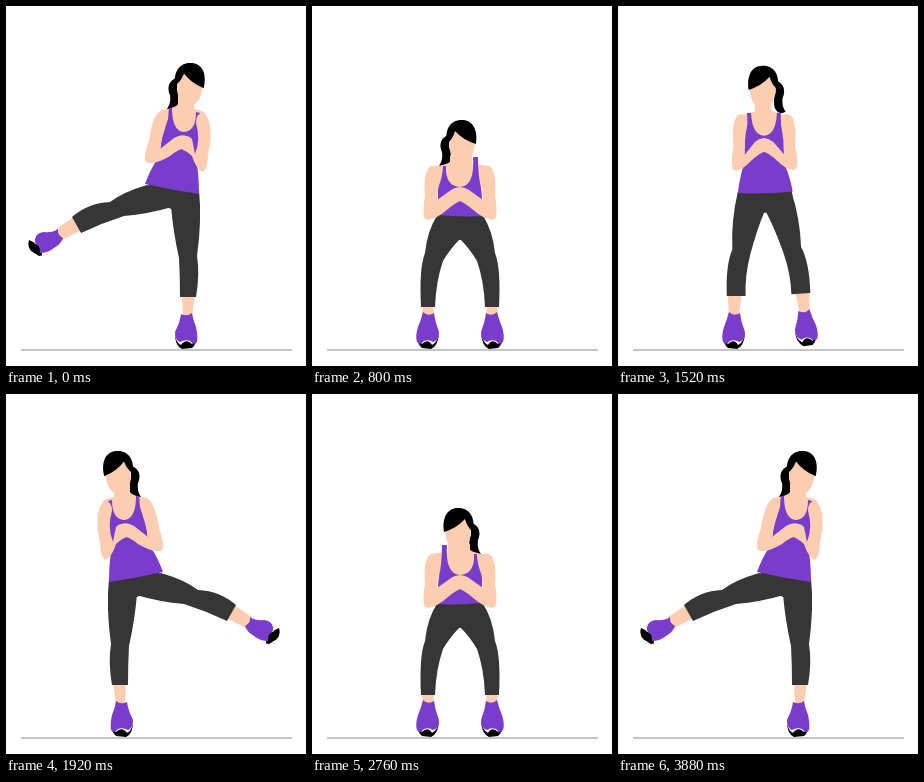
These frames come from a looping animation (300x360 px, 3920 ms). An HTML page:

```html
<!DOCTYPE html>
<html lang="en">
<head>
<meta charset="utf-8">
<title>Squat with side kick</title>
<style>
  html, body { margin: 0; width: 100%; height: 100%; overflow: hidden; background: #fff; }
  svg { display: block; width: 100%; height: 100%; }
</style>
</head>
<body>
<svg id="stage" viewBox="0 0 300 360">
  <path d="M15 344H286" stroke="#8c8c8c" stroke-width="1.2"/>
  <g id="figure"></g>
</svg>
<script>
const LOOP = 3920, HALF = LOOP / 2, STEP = 40, AXIS = 148;
const SKIN = '#fccdb0', PURPLE = '#7a3dcb', DARK = '#363636', BLACK = '#000', WHITE = '#fff';
const KICK_ANGLE = Math.PI / 3, HIP = [135, 195], HIP_KICK = [152, 190];

const figure = document.getElementById('figure');
const numbers = d => d.match(/-?[\d.]+/g).map(Number);
const mirror = d => {
  let i = 0;
  return d.replace(/-?[\d.]+/g, n => i++ % 2 ? n : 2 * AXIS - n);
};
const turn = (x, y, a) => [x * Math.cos(a) - y * Math.sin(a), x * Math.sin(a) + y * Math.cos(a)];

function add(fill, d, parent = figure) {
  const el = document.createElementNS('http://www.w3.org/2000/svg', 'path');
  el.setAttribute('fill', fill);
  if (d) el.setAttribute('d', d);
  parent.appendChild(el);
  return el;
}

function addGroup() {
  return figure.appendChild(document.createElementNS('http://www.w3.org/2000/svg', 'g'));
}

// A part blends three outlines: standing, kicking and squatting.
const parts = [];
function part(fill, stand, kick, squat = stand, swings = false) {
  let kicked = numbers(kick);
  if (swings) {
    for (let i = 0; i < kicked.length; i += 2) {
      const [x, y] = turn(kicked[i] - HIP_KICK[0], kicked[i + 1] - HIP_KICK[1], -KICK_ANGLE);
      kicked[i] = HIP[0] + x;
      kicked[i + 1] = HIP[1] + y;
    }
  }
  parts.push({ el: add(fill), stand, base: numbers(stand), kicked, squat: numbers(squat), swings });
}

// Right-hand outline serves the supporting side; its mirror image is the kicking side.
function legPart(fill, stand, support, kick, squat = stand) {
  part(fill, stand, support, squat);
  part(fill, mirror(stand), kick, mirror(squat), true);
}

function shape({ stand, base, kicked, squat, swings }, k, s) {
  const p = base.map((n, i) => n + k * (kicked[i] - n) + s * (squat[i] - n));
  if (swings) {
    for (let i = 0; i < p.length; i += 2) {
      const [x, y] = turn(p[i] - HIP[0], p[i + 1] - HIP[1], KICK_ANGLE * k);
      p[i] = x + HIP[0] + k * (HIP_KICK[0] - HIP[0]);
      p[i + 1] = y + HIP[1] + k * (HIP_KICK[1] - HIP[1]);
    }
  }
  let i = 0;
  return stand.replace(/-?[\d.]+/g, () => p[i++].toFixed(2));
}

const tail = addGroup();
add(BLACK, 'M136 75C127 77 126 86 129 92C130 99 128 103 126 106Q133 110 137 102Q139 94 136 87Z', tail);

// ankles
legPart(SKIN,
  'M172 287L186 287L185 309L175 309Z',
  'M176 288L189 288L186 310L177 310Z',
  'M76 224L68 211L50 223L56 234Z',
  'M174 298L186 298L185 312L175 312Z');
// shoes: sole, rim, upper
legPart(BLACK,
  'M169 328Q170 340 177 343L186 342Q191 338 191 328Z',
  'M169 328Q169 340 176 343L186 342Q191 338 191 328Z',
  'M46 245Q42 249 33 250L25 245Q21 240 23 234Z');
legPart(WHITE,
  'M169 326Q170 336 176 339Q180 332 186 338Q191 334 191 326Z',
  'M169 326Q169 336 175 339Q180 332 186 338Q191 334 191 326Z',
  'M53 240Q47 248 36 250Q36 240 30 238Q27 238 29 232Z');
legPart(PURPLE,
  'M174 307Q180 311 185 306Q187 314 190 321Q193 330 191 336Q188 340 184 335Q179 333 175 336Q169 334 169 326Q173 316 174 307Z',
  'M175 308Q181 311 186 307Q187 314 190 321Q192 330 191 336Q188 340 184 335Q179 333 174 336Q169 334 169 326Q174 316 175 308Z',
  'M57 232Q51 229 52 223Q46 227 38 226Q30 227 29 233Q28 238 33 240Q34 243 34 247Q42 247 48 242Q55 238 57 232Z');
// leggings
legPart(DARK,
  'M147 190L175 186Q182 215 181 243Q188 258 187 290L168 290Q169 270 163 248Q156 222 148 205Z',
  'M165 190L193 184Q196 215 191 250Q194 268 190 291L174 291Q174 270 173 252Q167 225 165 200Z',
  'M168 190L141 179Q117 186 104 196Q82 197 66 211L75 227Q96 217 118 210Q142 208 166 201Z',
  'M146 212L170 208Q181 225 183 247Q189 262 187 301L173 301Q172 275 165 255Q158 243 148 233Z');
part(DARK,
  'M121 183L174 184L178 206L148 207L118 206Z',
  'M141 176L192 184L194 206L165 203L150 196Z',
  'M127 205L170 205L177 228L148 234L119 228Z');
// neck and chest
part(SKIN,
  'M141 95L157 95L157 106Q168 108 172 110L166 135L130 135L124 110Q138 108 141 104Z',
  'M172 90L188 92L188 103Q196 104 200 108L192 132L160 130L155 104Q170 102 172 98Z',
  'M138 150L160 150L160 158Q172 158 176 161L168 185L128 185L120 161Q134 159 138 156Z');
// top
part(PURPLE,
  'M131 107L135 107Q136 129 148 130Q160 129 161 107L165 107Q164 118 167 128Q168 150 169 160Q173 172 175 187Q147 189 120 186Q123 170 128 158Q129 140 128 130Q132 118 131 107Z',
  'M163 102L166 102Q166 124 177 126Q190 126 190 106L194 107Q191 116 195 126Q192 140 190 152Q193 168 193 188Q166 184 139 178Q144 164 152 152Q155 142 156 130Q162 115 163 102Z',
  'M131 160L134 160Q133 180 148 181Q163 180 161 151L166 151Q166 170 169 182Q170 190 170 194Q169 202 171 210Q149 211 126 209Q128 202 126 194Q126 188 126 182Q131 170 131 160Z');

const head = addGroup();
add(SKIN, 'M136 78Q136 102 149 103Q162 102 162 78Q158 64 149 64Q138 64 136 78Z', head);
add(BLACK, 'M134 84C131 67 139 60 149 60C160 60 165 70 163 84Q150 80 142 71Q140 79 134 84Z', head);

// arms
const armStand = 'M122 109Q131 106 131 118Q128 134 128 149L139 136Q146 130 153 134L152 145Q144 146 134 156Q122 168 116 163Q114 158 117 140Q115 113 122 109Z';
const armSquat = 'M119 160Q128 157 128 168Q126 184 125 194L139 184Q146 179 153 183L155 192Q144 196 136 203Q121 216 113 213Q110 208 113 190Q111 164 119 160Z';
part(SKIN, armStand,
  'M156 104Q164 102 162 113Q156 130 154 143L168 132Q176 127 183 131L182 141Q172 143 164 150Q147 160 140 156Q137 152 143 134Q147 107 156 104Z',
  armSquat);
part(SKIN, mirror(armStand),
  'M198 107Q190 106 190 117Q195 134 189 148L186 133Q182 128 174 131L172 142Q180 144 186 150Q190 163 197 166Q202 162 202 148Q209 118 198 107Z',
  mirror(armSquat));

const ease = (t, from, to) => {
  const p = Math.min(1, Math.max(0, (t - from) / (to - from)));
  return (1 - Math.cos(Math.PI * p)) / 2;
};

function render(ms) {
  const t = Math.floor(ms % LOOP / STEP) * STEP;
  const u = t % HALF;
  const kick = 1 - ease(u, 140, 620) + ease(u, 1440, 1920);
  const squat = (ease(u, 600, 880) - ease(u, 1200, 1480)) / 0.81;
  // The figure changes sides while it rests at the bottom of the squat.
  const flipped = t >= 1000 && t < 1000 + HALF;

  figure.setAttribute('transform', flipped ? `matrix(-1 0 0 1 ${2 * AXIS} 0)` : '');
  for (const p of parts) p.el.setAttribute('d', shape(p, kick, squat));
  const move = `translate(${35 * kick + squat} ${54 * squat - 3 * kick})`;
  tail.setAttribute('transform', move);
  head.setAttribute('transform', `${move} rotate(${5 * kick} 149 82)`);
}

const start = performance.now();
function tick() {
  render(performance.now() - start);
  requestAnimationFrame(tick);
}
tick();
</script>
</body>
</html>
```
